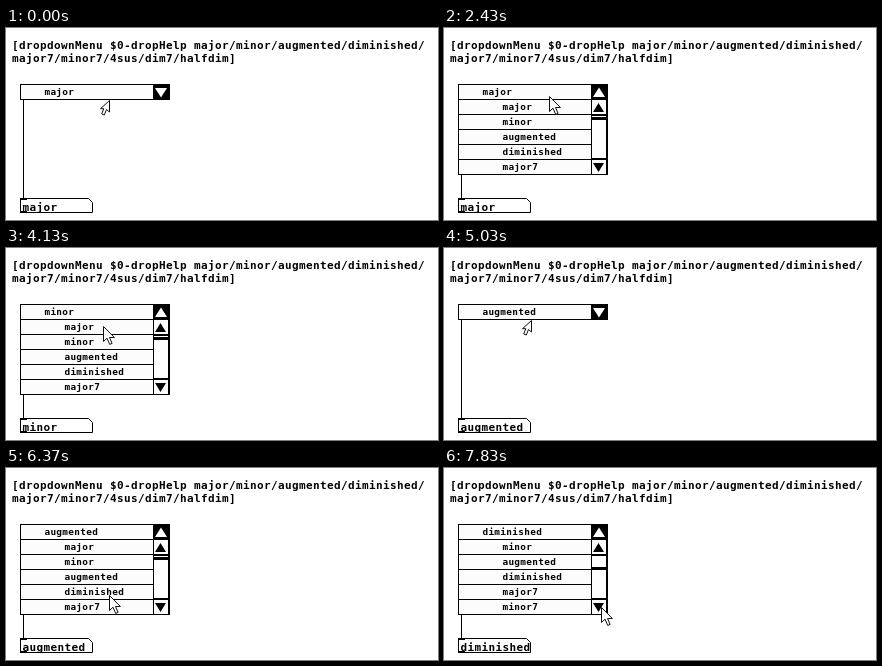
Animation of 432x192 px, one loop 8 s. Source, as an HTML page:

```html
<!DOCTYPE html>
<html lang="en">
<head>
<meta charset="utf-8">
<title>Dropdown menu</title>
<style>
html, body { margin: 0; width: 100%; height: 100%; overflow: hidden; background: #fff; }
svg { display: block; width: 432px; height: 192px; }
text { font: bold 11px "DejaVu Sans Mono", monospace; letter-spacing: .378px; white-space: pre; }
.small text, text.small { font-size: 9.4px; letter-spacing: .341px; }
.crisp { shape-rendering: crispEdges; }
.line { fill: none; stroke: #000; }
.field { fill: #fcfcfc; stroke: #000; }
.cursor { fill: #fff; stroke: #111; stroke-linejoin: round; }
</style>
</head>
<body>
<svg viewBox="0 0 432 192">
  <text x="6" y="21">[dropdownMenu $0-dropHelp major/minor/augmented/diminished/</text>
  <text x="6" y="34">major7/minor7/4sus/dim7/halfdim]</text>

  <path class="line" d="M14.5 170.5H82.5L86.5 174.5V184.5H14.5Z"/>
  <g class="crisp">
    <path class="line" d="M17.5 72V170"/>
    <path d="M14 170h7v2h-7zM14 183h7v2h-7z"/>
    <rect class="field" x="14.5" y="56.5" width="149" height="15"/>
    <rect x="147" y="56" width="17" height="16"/>
  </g>
  <text id="value" x="16.4" y="183"></text>
  <text id="head" class="small" x="38.4" y="67"></text>
  <path id="toggle" fill="#fff"/>

  <g id="list" class="small">
    <g id="rows"></g>
    <g class="crisp">
      <rect x="147.5" y="71.5" width="16" height="75" fill="#fff" stroke="#000"/>
      <path d="M162 72h1v74h-1zM148 86h15v2h-15zM148 130h15v2h-15z"/>
      <rect id="knob" x="148" width="15" height="3"/>
    </g>
    <path d="M154.5 75L160 84H149ZM149 135H160L154.5 144Z"/>
  </g>

  <g id="cursor" class="cursor">
    <path id="left" d="M.5 .5V15.5L4 12.2L6.7 18.4L9.1 17.4L6.5 11.5H11.4Z"/>
    <path id="right" d="M-.5 .5V12L-3.5 9.5L-5.7 15L-8.3 14L-6.2 8.7H-9.5Z"/>
  </g>
</svg>
<script>
const LOOP = 8000;
const ROW = 15;
const VISIBLE = 5;
const items = "major/minor/augmented/diminished/major7/minor7/4sus/dim7/halfdim".split("/");

// Clicks open the menu and pick the next item in turn; the last one scrolls.
const clicks = [2430, 3300, 3970, 4800, 5370, 6600, 7030, 7830];

// Pointer moves: from, to, x, y
const start = [104, 72];
const moves = [
  [130, 200, 103, 68],
  [690, 770, 105, 68],
  [2600, 3130, 98, 93],
  [3300, 3800, 98, 65],
  [4045, 4570, 95, 108],
  [4800, 5030, 88, 72],
  [5030, 5230, 92, 62],
  [5500, 6070, 102, 128],
  [6230, 6370, 103, 127],
  [6600, 6830, 118, 60],
  [7030, 7750, 157, 139]
];

const $ = id => document.getElementById(id);
const show = (el, on) => el.setAttribute("visibility", on ? "inherit" : "hidden");
const easeOut = k => 1 - (1 - k) ** 2;
const progress = (t, from, to) => Math.min(1, Math.max(0, (t - from) / (to - from)));

$("rows").innerHTML = Array.from({ length: VISIBLE }, (_, i) => {
  const y = 71.5 + ROW * i;
  return `<rect class="field crisp" x="14.5" y="${y}" width="133" height="${ROW}"/>
    <text x="58.4" y="${y + 10.5}"></text>`;
}).join("");
const labels = [...$("rows").querySelectorAll("text")];

function pointerAt(t) {
  let [x, y] = start;
  for (const [from, to, nextX, nextY] of moves) {
    const k = easeOut(progress(t, from, to));
    x += (nextX - x) * k;
    y += (nextY - y) * k;
  }
  return [Math.round(x), Math.round(y)];
}

let shown;
function setMenu(count) {
  if (count === shown) return;
  shown = count;
  const scroll = count === clicks.length ? 1 : 0;
  const toggles = count - scroll;
  const open = toggles % 2 === 1;
  const picked = items[Math.floor(toggles / 2)];
  $("head").textContent = $("value").textContent = picked;
  $("toggle").setAttribute("d", open ? "M155 59.5L161 69H149Z" : "M149 60H161L155 69.5Z");
  $("knob").setAttribute("y", 89 + 10 * scroll);
  labels.forEach((label, i) => label.textContent = items[i + scroll]);
  show($("list"), open);
  return open;
}

function draw() {
  const t = performance.now() % LOOP;
  const count = clicks.filter(click => click <= t).length;
  const [x, y] = pointerAt(t);
  const closed = count % 2 === 0 && count < clicks.length;
  const clickable = closed && y >= 70 && y <= 76;
  setMenu(count);
  $("cursor").setAttribute("transform", `translate(${x} ${y})`);
  show($("left"), !clickable);
  show($("right"), clickable);
  requestAnimationFrame(draw);
}
draw();
</script>
</body>
</html>
```
